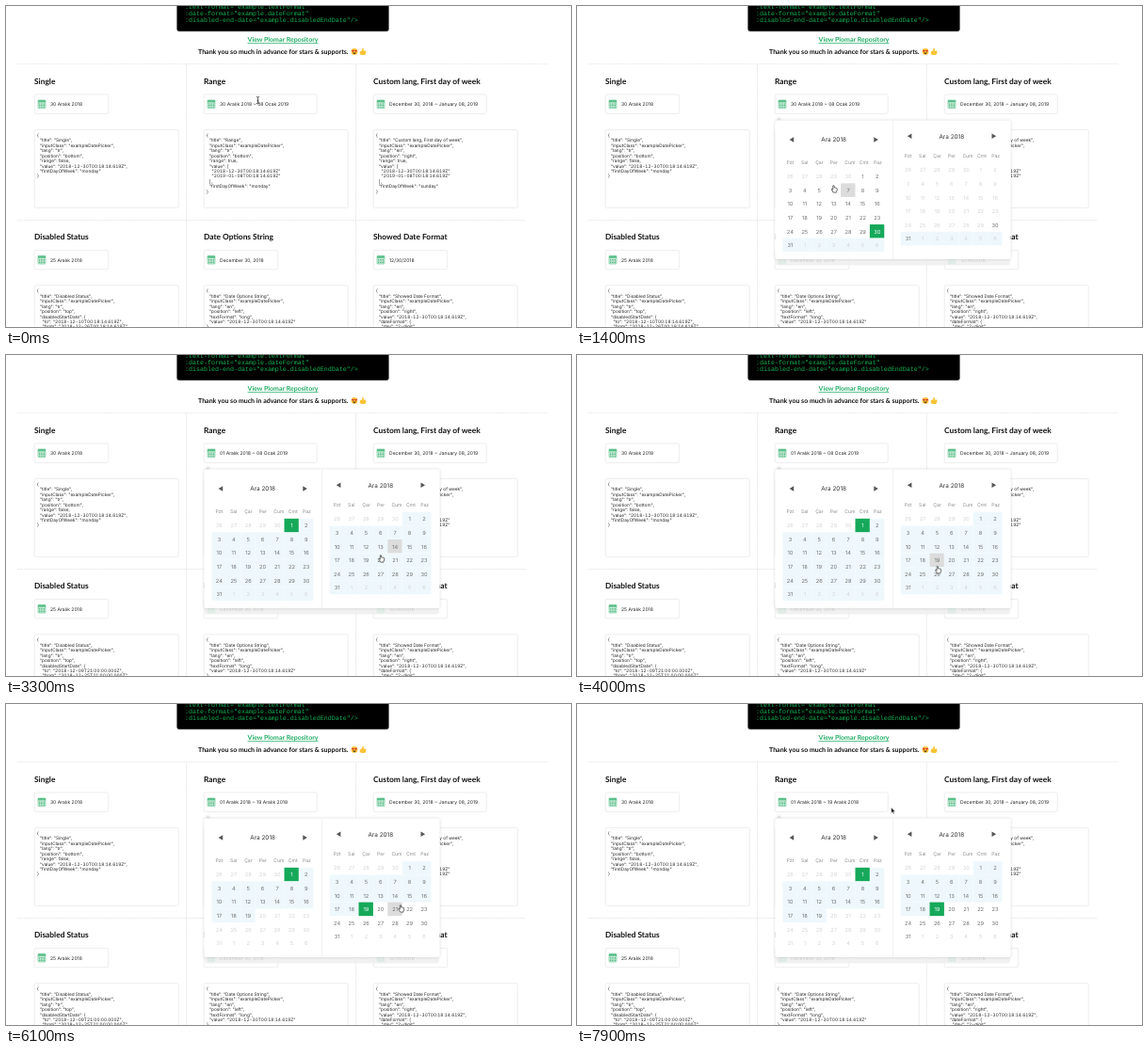
Recreate the animation shown at these times as an HTML page. Size 600 by 341 pixels, loop 8 s.

```html
<!DOCTYPE html>
<html lang="en">
<head>
<meta charset="utf-8">
<title>Date picker demo</title>
<style>
  html, body { margin: 0; width: 100%; height: 100%; overflow: hidden; background: #fff; }
  svg { display: block; width: 100vw; height: 100vh; }
  text { font-family: Inter, Roboto, sans-serif; white-space: pre; text-rendering: geometricPrecision; }
  .head { font: 700 8.4px Lato, sans-serif; fill: #111; }
  .note { font: 700 7px Lato, sans-serif; fill: #111; }
  .link { fill: #20ad64; text-decoration: underline; text-decoration-thickness: .6px; }
  .code { font: 6.67px "Liberation Mono", monospace; fill: #16b455; }
  .json { font-size: 4.75px; fill: #222; font-variant-numeric: tabular-nums; }
  .field { font-size: 5.05px; fill: #222; }
  .month { font-size: 6.4px; fill: #333; }
  .week { font-size: 5.1px; fill: #8a8a8a; }
  .day { font-size: 5.7px; }
  .mid { text-anchor: middle; }
  .box { fill: #fff; stroke: #e6e6e6; stroke-width: .7; }
  .rule { stroke: #dedede; stroke-width: .7; stroke-dasharray: 1.5 .8; }
  #panel { filter: drop-shadow(0 .5px 1.5px rgba(0, 0, 0, .16)); }
</style>
</head>
<body>
<svg id="stage" viewBox="0 0 600 341" preserveAspectRatio="none"></svg>
<script>
const LOOP = 8000, STEP = 100;
const OPEN = 500, PICK_START = 2700, PICK_END = 4700;
const GREEN = '#16a95a', PALE = '#eef8fc', HOVER = '#dcdcdc';
const stage = document.getElementById('stage');

function add(parent, tag, attrs = {}, content) {
  const node = document.createElementNS('http://www.w3.org/2000/svg', tag);
  for (const key in attrs) node.setAttribute(key, attrs[key]);
  if (content !== undefined) node.textContent = content;
  parent.append(node);
  return node;
}
const label = (parent, cls, x, y, content) => add(parent, 'text', { class: cls, x, y }, content);
const box = (x, y, width, height) => add(stage, 'rect', { class: 'box', x, y, width, height, rx: 1.5 });
const rule = (x1, y1, x2, y2) => add(stage, 'line', { class: 'rule', x1, y1, x2, y2 });

// Page header
add(stage, 'rect', { x: 181.5, y: -10, width: 225, height: 37.5, rx: 2.5, fill: '#ccc' });
add(stage, 'rect', { x: 181.5, y: -10, width: 225, height: 36.8, rx: 2.5, fill: '#000' });
[':text-format="example.textFormat"', ':date-format="example.dateFormat"',
 ':disabled-end-date="example.disabledEndDate"/>']
  .forEach((line, i) => label(stage, 'code', 190, 2.6 + i * 7.35, line));
label(stage, 'note link mid', 294, 38.2, 'View Plomar Repository');
label(stage, 'note', 204, 51, 'Thank you so much in advance for stars & supports.');

const face = add(stage, 'g', { transform: 'translate(370 48.4)' });
add(face, 'circle', { r: 3.4, fill: '#fbc437' });
for (const x of [-1.6, 1.6])
  add(face, 'path', { d: `M${x} .6l-1.4-1.5q0-1.3 1.4-.6q1.4-.7 1.4.6z`, fill: '#d8352f' });
add(face, 'path', { d: 'M-1.8 1.1h3.6q-.6 1.7-1.8 1.7t-1.8-1.7z', fill: '#6b3a12' });
add(stage, 'path', {
  d: 'M375.8 48.2l1.7-.4 1.4-3q1.3-.2 1 1.4l-.4 1.4h2.3q1 .3.5 1.2.5.7-.2 1.3.2.8-.5 1.1 0 .8-1 .8h-2.8l-2-.7z',
  fill: '#fbc437'
});

rule(12, 61.6, 575, 61.6);
rule(12, 227.5, 552, 227.5);
rule(191.5, 62, 191.5, 341);
rule(371.5, 62, 371.5, 341);

// Example cards
const STAMP = '2018-12-30T00:18:14.619Z';
const intro = (title, lang, position) => [
  '{', ` "title": "${title}",`, ' "inputClass": "exampleDatePicker",',
  ` "lang": "${lang}",`, ` "position": "${position}",`
];
const span = first => [
  ' "range": true,', ' "value": [', `  "${STAMP}"`, '  "2019-01-08T00:18:14.619Z"', ' ],',
  ` "firstDayOfWeek": "${first}"`, '}'
];

function icon(x, y) {
  add(stage, 'rect', { x, y, width: 8, height: 8.6, rx: .6, fill: '#d3efdf', stroke: '#5cc08b', 'stroke-width': .6 });
  add(stage, 'rect', { x, y, width: 8, height: 2.4, fill: '#5cc08b' });
  add(stage, 'path', {
    d: `M${x + 1.1} ${y + 4}h6M${x + 1.1} ${y + 5.6}h6M${x + 1.1} ${y + 7.2}h6`,
    stroke: '#2ba868', 'stroke-width': .9, 'stroke-dasharray': '1 .65'
  });
}

function card(col, row, title, value, width, lines) {
  const x = 30 + col * 180, y = row * 165.4;
  label(stage, 'head', x, y + 82.7, title);
  box(x + .2, y + 94, width, 20.4);
  icon(x + 4, y + 100);
  const field = label(stage, 'field', x + 17, y + 106.1, value);
  box(x + .2, y + 131.4, 153, 83);
  const code = lines.map((line, i) => {
    const indent = line.search(/\S/);
    return label(stage, 'json', x + 3 + indent * 2.8, y + 138.9 + i * 5.44, line.trim());
  });
  return { field, code };
}

card(0, 0, 'Single', '30 Aralık 2018', 78.5, [
  ...intro('Single', 'tr', 'bottom'), ' "range": false,', ` "value": "${STAMP}",`, ' "firstDayOfWeek": "monday"', '}']);
const range = card(1, 0, 'Range', '', 120, [...intro('Range', 'tr', 'bottom'), ...span('monday')]);
card(2, 0, 'Custom lang, First day of week', 'December 30, 2018 ~ January 08, 2019', 120,
  [...intro('Custom lang, First day of week', 'en', 'right'), ...span('sunday')]);
const limits = card(0, 1, 'Disabled Status', '25 Aralık 2018', 78.5,
  [...intro('Disabled Status', 'tr', 'top'), ' "disabledStartDate": {', '  "to": ""', '  "from": ""']);
card(1, 1, 'Date Options String', 'December 30, 2018', 78.5,
  [...intro('Date Options String', 'en', 'left'), ' "textFormat": "long",', ` "value": "${STAMP}"`, '}']);
card(2, 1, 'Showed Date Format', '12/30/2018', 78.5,
  [...intro('Showed Date Format', 'en', 'right'), ` "value": "${STAMP}",`, ' "dateFormat": {', '  "day": "2-digit",']);

// Popup with two months, its lower edge a translucent strip
const popup = add(stage, 'g');
add(popup, 'rect', { x: 211, y: 255, width: 249, height: 20.5, rx: 3, fill: '#efefef', 'fill-opacity': .85 });
const panel = add(popup, 'g', { id: 'panel' });
add(panel, 'path', { d: 'M211.5 122l3-3.6 3 3.6z', fill: '#ddd' });
add(panel, 'rect', { x: 210.3, y: 121.5, width: 250.4, height: 147.5, rx: 2, fill: '#fff' });
add(popup, 'path', { d: 'M335.5 122v147', stroke: '#eee', 'stroke-width': .8 });

const CELL_W = 15.4, CELL_H = 14.56;
const WEEK = ['Pzt', 'Sal', 'Çar', 'Per', 'Cum', 'Cmt', 'Paz'];
const WEEK_X = [0, 15.2, 31, 46.5, 63.4, 78.4, 93];

function month(x, y, titleX, titleY) {
  label(popup, 'month mid', titleX, titleY + 2.4, 'Ara 2018');
  add(popup, 'path', {
    d: `M${titleX - 47} ${titleY}l4.6-2.7v5.4zM${titleX + 47.3} ${titleY}l-4.6-2.7v5.4z`, fill: '#555'
  });
  WEEK.forEach((name, i) => label(popup, 'week mid', x + 7.9 + WEEK_X[i], y - 5.6, name));
  const cells = Array.from({ length: 42 }, (_, i) => {
    const cx = x + i % 7 * CELL_W, cy = y + Math.floor(i / 7) * CELL_H;
    const day = i - 4;
    const rect = add(popup, 'rect', { x: cx, y: cy, width: CELL_W, height: CELL_H });
    const shown = day < 1 ? day + 30 : day > 31 ? day - 31 : day;
    return { day, rect, text: label(popup, 'day mid', cx + CELL_W / 2 + .2, cy + 9.5, shown) };
  });
  return { x, y, cells };
}
const months = [month(218.5, 173.8, 272.6, 142), month(343.7, 166.9, 397.8, 138.3)];

// Per stage and month: selected day, tinted days, enabled days
const STAGES = [
  [{ pick: 30, tint: [31, 37], on: [1, 31] }, { tint: [31, 37], on: [30, 31] }],
  [{ pick: 1, tint: [2, 37], on: [1, 31] }, { tint: [1, 37], on: [1, 31] }],
  [{ pick: 1, tint: [2, 19], on: [1, 19] }, { pick: 19, tint: [1, 18], on: [1, 31] }]
];
const VALUES = ['30 Aralık 2018 ~ 08 Ocak 2019', '01 Aralık 2018 ~ 08 Ocak 2019', '01 Aralık 2018 ~ 19 Aralık 2018'];
const within = (n, [low, high]) => n >= low && n <= high;

// Pointer: time, x, y of its tip
const PATH = [
  [0, 267.5, 100], [400, 267.5, 103], [700, 268, 106], [1000, 284, 172], [1200, 289, 193],
  [1300, 284, 192], [1400, 272.5, 190.5], [1800, 280, 195], [2200, 304, 185], [2400, 307, 183],
  [2700, 307, 183], [2900, 345, 188], [3100, 415, 203], [3200, 410, 205], [3300, 398, 212.5],
  [3700, 383, 224], [4600, 382.5, 225], [5500, 382.5, 225], [5800, 402, 220], [6100, 419, 213.5],
  [6300, 425, 214], [6900, 427, 215], [7200, 366, 140], [7500, 340, 116], [7900, 333.7, 110]
];
function pointAt(t) {
  const next = PATH.findIndex(p => p[0] > t);
  if (next < 1) return PATH[next ? PATH.length - 1 : 0].slice(1);
  const [t0, x0, y0] = PATH[next - 1], [t1, x1, y1] = PATH[next];
  const k = (t - t0) / (t1 - t0);
  return [x0 + (x1 - x0) * k, y0 + (y1 - y0) * k];
}
function cellAt([x, y], rules) {
  for (let m = 0; m < 2; m++) {
    const col = Math.floor((x - months[m].x) / CELL_W), row = Math.floor((y - months[m].y) / CELL_H);
    if (!within(col, [0, 6]) || !within(row, [0, 5])) continue;
    const cell = months[m].cells[row * 7 + col];
    return within(cell.day, rules[m].on) ? cell : null;
  }
  return null;
}

const cursor = add(stage, 'g');
const outline = { fill: '#fff', stroke: '#222', 'stroke-width': .65, 'stroke-linejoin': 'round' };
const shapes = {
  beam: add(cursor, 'path', {
    d: 'M-1.4-3.6q1.2 0 1.4.8.2-.8 1.4-.8M0-2.8v5.6M-1.4 3.6q1.2 0 1.4-.8.2.8 1.4.8M-.8.8h1.6',
    fill: 'none', stroke: '#111', 'stroke-width': .7
  }),
  hand: add(cursor, 'path', {
    ...outline,
    d: 'M-.7.4q.7-.8 1.3 0v2.2q.6-.5 1.1.1.7-.4 1.1.2.8-.2.9.6v2l-.7 1.3v.8h-3.2l-2-3.1q-.2-.8.6-.7l.9.8z'
  }),
  arrow: add(cursor, 'path', {
    d: 'M0 0v5.9l1.4-1.3.9 2.1 1-.4-.9-2.1h1.8z', fill: '#111', stroke: '#fff', 'stroke-width': .4
  })
};

function draw(t) {
  const step = t < PICK_START ? 0 : t < PICK_END ? 1 : 2;
  const rules = STAGES[step], open = t >= OPEN;
  const tip = pointAt(t);
  const under = open ? cellAt(tip, rules) : null;
  // Cell highlight trails the pointer slightly
  const hover = open ? cellAt(pointAt(Math.max(0, t - 120)), rules) : null;

  popup.style.display = open ? '' : 'none';
  range.field.textContent = VALUES[step];
  limits.code[6].textContent = `"to": "${step ? '2018-12-09T21:00:00.000Z' : '2018-12-10T00:18:14.619Z'}",`;
  limits.code[7].textContent = `"from": "${step ? '2018-12-25T21:00:00.000Z' : '2018-12-26T00:18:14.619Z'}"`;

  months.forEach(({ cells }, m) => {
    const { pick, tint, on } = rules[m];
    for (const cell of cells) {
      const picked = cell.day === pick;
      cell.rect.setAttribute('fill', picked ? GREEN : cell === hover ? HOVER : within(cell.day, tint) ? PALE : 'none');
      cell.text.setAttribute('fill', picked ? '#fff' : within(cell.day, on) ? '#707070' : '#d4d4d4');
    }
  });

  const overField = within(tip[0], [210, 330]) && within(tip[1], [94, 114.5]);
  const kind = under ? 'hand' : overField ? 'beam' : 'arrow';
  for (const name in shapes) shapes[name].style.display = name === kind ? '' : 'none';
  cursor.setAttribute('transform', `translate(${tip})`);
}

function tick() {
  const t = performance.now() % LOOP;
  draw(Math.floor(t / STEP) * STEP);
  requestAnimationFrame(tick);
}
tick();
</script>
</body>
</html>
```
